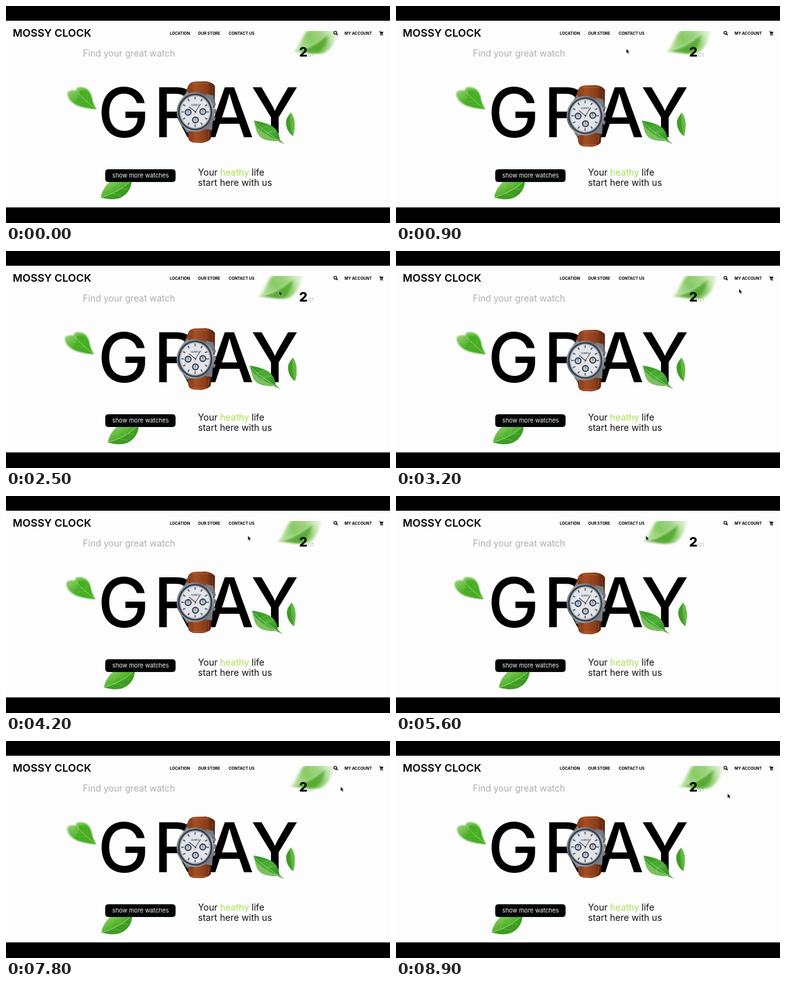
Write an HTML page that moves like this. It is 600 px wide and 339 px high and loops after 9000 ms.

```html
<!DOCTYPE html>
<html lang="en">
<head>
<meta charset="utf-8">
<title>Watch shop</title>
<style>
  @property --u { syntax: "<number>"; inherits: true; initial-value: 1; }

  html, body { margin: 0; width: 100%; height: 100%; overflow: hidden; background: #000; }
  svg { display: block; width: 100vw; height: 100vh; animation: drift 9s linear infinite; }
  text { font-family: Inter, "Open Sans", sans-serif; white-space: pre; }

  .logo { font-size: 16.5px; font-weight: 600; }
  .nav { font-size: 6.1px; font-weight: 700; }
  .lead { font-size: 14px; fill: #adadb0; }
  .body { font-size: 14.1px; fill: #111; }
  .big { font-size: 107px; font-weight: 550; text-anchor: middle; }

  /* leaves share one sway value; --d is each leaf's reach */
  .leaf { transform: translateX(calc((var(--u) - 1) * var(--d) * 1px)); }
  .watch { animation: bob 9s ease-in-out infinite; }
  .cursor { animation: point 9s linear infinite, appear 9s step-end infinite; }

  /* the sway trails the pointer */
  @keyframes drift {
    0% { --u: 1; }
    3.33% { --u: .96; }
    7.78% { --u: .77; }
    11.11% { --u: .55; }
    15.56% { --u: .16; }
    18.89% { --u: 0; }
    22.22% { --u: -.06; }
    26.67% { --u: .12; }
    31.11% { --u: .5; }
    35.56% { --u: .76; }
    40% { --u: .86; }
    43.33% { --u: .82; }
    46.67% { --u: .64; }
    51.11% { --u: .36; }
    55.56% { --u: .12; }
    60% { --u: -.02; }
    62.22% { --u: .1; }
    66.67% { --u: .4; }
    71.11% { --u: .76; }
    75.56% { --u: .94; }
    80% { --u: .98; }
    88.89% { --u: .91; }
    100% { --u: .9; }
  }

  @keyframes bob {
    0%, 22.22%, 44.44%, 66.67%, 88.89%, 100% { transform: translateY(-1px); }
    11.11%, 33.33%, 55.56%, 77.78% { transform: translateY(5px); }
  }

  @keyframes appear {
    0% { opacity: 0; }
    1% { opacity: 1; }
  }

  @keyframes point {
    0%, 1% { transform: translate(527px, 70px); }
    4.44% { transform: translate(485px, 70px); }
    11.11% { transform: translate(335px, 66px); }
    16.67% { transform: translate(268px, 65px); }
    18.89% { transform: translate(277px, 65px); }
    22.22% { transform: translate(310px, 64px); }
    28.89% { transform: translate(450px, 62px); }
    33.33% { transform: translate(526px, 60px); }
    35.56% { transform: translate(536px, 59px); }
    38.89% { transform: translate(520px, 60px); }
    44.44% { transform: translate(430px, 62px); }
    46.67% { transform: translate(378px, 62px); }
    51.11% { transform: translate(310px, 64px); }
    56.67% { transform: translate(300px, 65px); }
    62.22% { transform: translate(390px, 62px); }
    66.67% { transform: translate(501px, 50px); }
    71.11% { transform: translate(535px, 34px); }
    75.56%, 78.89% { transform: translate(544px, 21px); }
    83.33% { transform: translate(530px, 55px); }
    88.89%, 100% { transform: translate(518px, 82px); }
  }
</style>
</head>
<body>
<svg viewBox="0 0 600 339" preserveAspectRatio="none">
  <defs>
    <linearGradient id="fresh" x1="0" y1="0" x2="1" y2="1">
      <stop offset="0" stop-color="#a6d884"/>
      <stop offset=".45" stop-color="#55b52f"/>
      <stop offset="1" stop-color="#2f9a18"/>
    </linearGradient>
    <linearGradient id="deep" x1="0" y1="0" x2="1" y2="1">
      <stop offset="0" stop-color="#2f9422"/>
      <stop offset=".5" stop-color="#4cae35"/>
      <stop offset="1" stop-color="#227d1a"/>
    </linearGradient>
    <linearGradient id="haze" x1="0" y1=".7" x2="1" y2=".3">
      <stop offset="0" stop-color="#a5d884" stop-opacity=".7"/>
      <stop offset=".4" stop-color="#86ca62"/>
      <stop offset=".7" stop-color="#93cf73" stop-opacity=".9"/>
      <stop offset="1" stop-color="#b5e09c" stop-opacity=".45"/>
    </linearGradient>
    <linearGradient id="leather" x1="0" x2="1">
      <stop offset="0" stop-color="#6b2f12"/>
      <stop offset=".35" stop-color="#a64e24"/>
      <stop offset=".75" stop-color="#873c19"/>
      <stop offset="1" stop-color="#4a1d08"/>
    </linearGradient>
    <linearGradient id="steel" x1="0" y1="0" x2="1" y2="1">
      <stop offset="0" stop-color="#c3c7cc"/>
      <stop offset=".35" stop-color="#62676e"/>
      <stop offset=".65" stop-color="#a8adb3"/>
      <stop offset="1" stop-color="#454a51"/>
    </linearGradient>
    <filter id="soft" x="-20%" y="-20%" width="140%" height="140%"><feGaussianBlur stdDeviation="1.2"/></filter>
    <filter id="blur" x="-30%" y="-30%" width="160%" height="160%"><feGaussianBlur stdDeviation="2.4 1.5"/></filter>
    <clipPath id="page"><rect y="39" width="600" height="276"/></clipPath>
    <g id="sub">
      <circle r="5.4" fill="#26374e"/>
      <circle r="3.5" fill="#dfe3e7"/>
      <circle r="2.2" fill="none" stroke="#6a7380" stroke-width=".5"/>
      <path d="M0 1V-3" stroke="#26374e" stroke-width=".7"/>
    </g>
  </defs>

  <rect width="600" height="339"/>
  <rect y="23" width="600" height="291.6" fill="#fefdfe"/>

  <text class="logo" x="10.5" y="48">MOSSY CLOCK</text>
  <g class="nav">
    <text x="256" y="44.6">LOCATION</text>
    <text x="300" y="44.6">OUR STORE</text>
    <text x="348" y="44.6">CONTACT US</text>
    <text x="529" y="44.6">MY ACCOUNT</text>
  </g>
  <text class="lead" x="120" y="79.3">Find your great watch</text>
  <text x="471" y="79.4" font-size="7.2" fill="#a8a8ab">/21</text>

  <g class="big">
    <text x="183.5" y="204.5">G</text>
    <text x="265.5" y="204.5">R</text>
    <text x="349.5" y="204.5">A</text>
    <text x="420" y="204.5">Y</text>
  </g>

  <!-- out-of-focus leaf -->
  <g clip-path="url(#page)">
    <g class="leaf" style="--d:70">
      <path d="M449 72C457 67 461 52 470 39L480 34H517C517 50 509 66 498 73C484 78 470 71 449 72Z" fill="url(#haze)" filter="url(#blur)"/>
      <path d="M455 70C475 67 488 59 503 44C502 57 498 67 490 72C479 76 468 72 455 70Z" fill="#479f22" opacity=".75" filter="url(#blur)"/>
      <path d="M455 70C473 65 489 56 506 41" fill="none" stroke="#d1ebbe" stroke-width="1.5" opacity=".6" filter="url(#soft)"/>
    </g>
  </g>
  <text x="458" y="79.4" font-size="20.5" font-weight="800">2</text>

  <!-- heart-shaped leaf -->
  <g class="leaf" style="--d:5">
    <path d="M141 161C128 160 112 158 104 151C97 145 94 138 97 134C100 131 106 131 110 132C109 128 112 126 119 127C128 128 132 134 134 142C135 150 138 157 141 161Z" fill="url(#fresh)" filter="url(#soft)"/>
    <path d="M141.500 161C132 160 119 158 109 151C113 145 115 139 115 132C124 131 131 135 133 142C135 151 138 157 141.500 161Z" fill="#48ae23"/>
    <path d="M140 160C130 153 120 144 112 135" fill="none" stroke="#a2dc7f" stroke-width=".8"/>
    <path d="M126 149L113 150M120 143L105 143M126 148L128 136" fill="none" stroke="#82cb5c" stroke-width=".6" opacity=".6"/>
  </g>

  <!-- pointed leaf -->
  <g class="leaf" style="--d:8.500">
    <path d="M387 179C400 181 413 184 420 191C426 197 427 203 428 209L435 215.500L425 211C414 211 403 210 397 204C390 197 391 188 387 179Z" fill="url(#deep)"/>
    <path d="M387 179C392 192 405 203 428 210L425 211C414 211 403 210 397 204C390 197 391 188 387 179Z" fill="#79c05b"/>
    <path d="M387 179C399 192 413 202 435 215" fill="none" stroke="#b4dc98" stroke-width=".8"/>
    <path d="M399 191L411 187M407 198L421 195M399 191L398 202M408 199L409 207" fill="none" stroke="#8fcb72" stroke-width=".5"/>
  </g>

  <!-- slim leaf -->
  <g class="leaf" style="--d:-4">
    <path d="M445 166.500C451 174 453 187 448.500 203.500C441 198 437 189 437.500 181C438 175 442 171 445 166.500Z" fill="#3f9e22"/>
    <path d="M445 166.500C451 174 453 187 448.500 203.500C448 190 445 180 445 166.500Z" fill="#68ba43"/>
    <path d="M445 168C444 180 446 193 448.500 203" fill="none" stroke="#a3d685" stroke-width=".6"/>
  </g>

  <!-- leaf under the button -->
  <g class="leaf" style="--d:-14">
    <path d="M148 299C150 289 155 280 164 273H196C196 285 189 296 176 300.500C165 303 155 301 148 299Z" fill="url(#fresh)"/>
    <path d="M148 299C166 294 184 284 195 273H196C196 285 189 296 176 300.500C165 303 155 301 148 299Z" fill="#3f9c22"/>
    <path d="M148 299C166 294 183 285 194 274" fill="none" stroke="#b4df98" stroke-width=".9"/>
    <path d="M162 294L166 279M173 289L179 276M165 293L179 296M177 286L190 286" fill="none" stroke="#7ac356" stroke-width=".6"/>
  </g>

  <rect x="155.500" y="255.500" width="109" height="19" rx="4" fill="#020503" stroke="#06170c"/>
  <text x="166" y="268.400" font-size="9.350" fill="#f4f4f4">show more watches</text>

  <text class="body" x="300" y="265.300">Your <tspan fill="#a9e052">heathy</tspan> life</text>
  <text class="body" x="300" y="280.800">start here with us</text>

  <g class="watch">
    <path d="M279 140L285 125Q287 120 295 119L312 118.500Q323 120 326.500 126L326 160L304 168Z" fill="url(#leather)"/>
    <path d="M283 136L289 125M323 127V152M292 122L316 122" fill="none" stroke="#d39368" stroke-width=".6" stroke-dasharray="1.500 1"/>
    <path d="M282 190L285 208Q286 213 293 214.500L306 215Q318 213 320 208L322 184Z" fill="url(#leather)"/>
    <path d="M286.500 199L288 209M317 197L316 208M290 212H314" fill="none" stroke="#d39368" stroke-width=".6" stroke-dasharray="1.500 1"/>
    <path d="M275 145L283 134L289 140ZM312 138L324 141L326 153L318 156ZM276 187L282 199L291 196ZM311 193L322 195L323 180Z" fill="#767c83"/>
    <g fill="#777d84" stroke="#3f444a" stroke-width=".6">
      <rect x="321" y="151" width="6" height="6" rx="1.500" transform="rotate(-15 324 154)"/>
      <rect x="323" y="162" width="5" height="7" rx="1.500"/>
      <rect x="321" y="174" width="6" height="6" rx="1.500" transform="rotate(15 324 177)"/>
    </g>
    <ellipse cx="296" cy="166.500" rx="29.500" ry="31" fill="url(#steel)"/>
    <ellipse cx="295.500" cy="166.500" rx="26.800" ry="28.600" fill="#343e4c"/>
    <ellipse cx="295.500" cy="166.500" rx="24.300" ry="26.300" fill="#a3a8af"/>
    <ellipse cx="295.500" cy="166.500" rx="23" ry="25" fill="#e2e4e8"/>
    <ellipse cx="295.500" cy="166.500" rx="19.500" ry="21.500" fill="none" stroke="#56606e" stroke-width="4" pathLength="120" stroke-dasharray="1.800 8.200" stroke-dashoffset=".9"/>
    <ellipse cx="295.500" cy="166.500" rx="22.500" ry="24.500" fill="none" stroke="#7a828d" stroke-width=".8" pathLength="120" stroke-dasharray=".6 1.400"/>
    <text x="295.500" y="156.500" font-size="3" font-weight="600" text-anchor="middle" fill="#333b46">QUARTZ</text>
    <use href="#sub" x="284.500" y="167"/>
    <use href="#sub" x="307.500" y="166"/>
    <use href="#sub" x="296" y="179"/>
    <path d="M296 166.500L286 158.500M296 166.500L304 154" stroke="#35445a" stroke-width="1.100"/>
    <path d="M294 171L301 158" stroke="#d98442" stroke-width=".8"/>
    <circle cx="296" cy="166.500" r="1.300" fill="#35445a"/>
  </g>

  <!-- search and cart icons -->
  <g fill="none" stroke="#000" stroke-width="1.200">
    <circle cx="514.600" cy="41.700" r="2.200"/>
    <path d="M516.200 43.300L518.300 45.500" stroke-width="1.500"/>
  </g>
  <path d="M583 39.500H584.800L585.200 40.300H589.500L588.800 43.300H585.800L586 44.200H588.800V45H585.200L584.200 40.300H583Z"/>
  <circle cx="585.900" cy="45.500" r=".7"/>
  <circle cx="588.400" cy="45.500" r=".7"/>

  <path class="cursor" d="M0 0V7.200L1.700 5.700L2.900 8.300L4.200 7.700L3 5.200H5.200Z" fill="#000" stroke="#fff" stroke-width=".5"/>
</svg>
</body>
</html>
```
